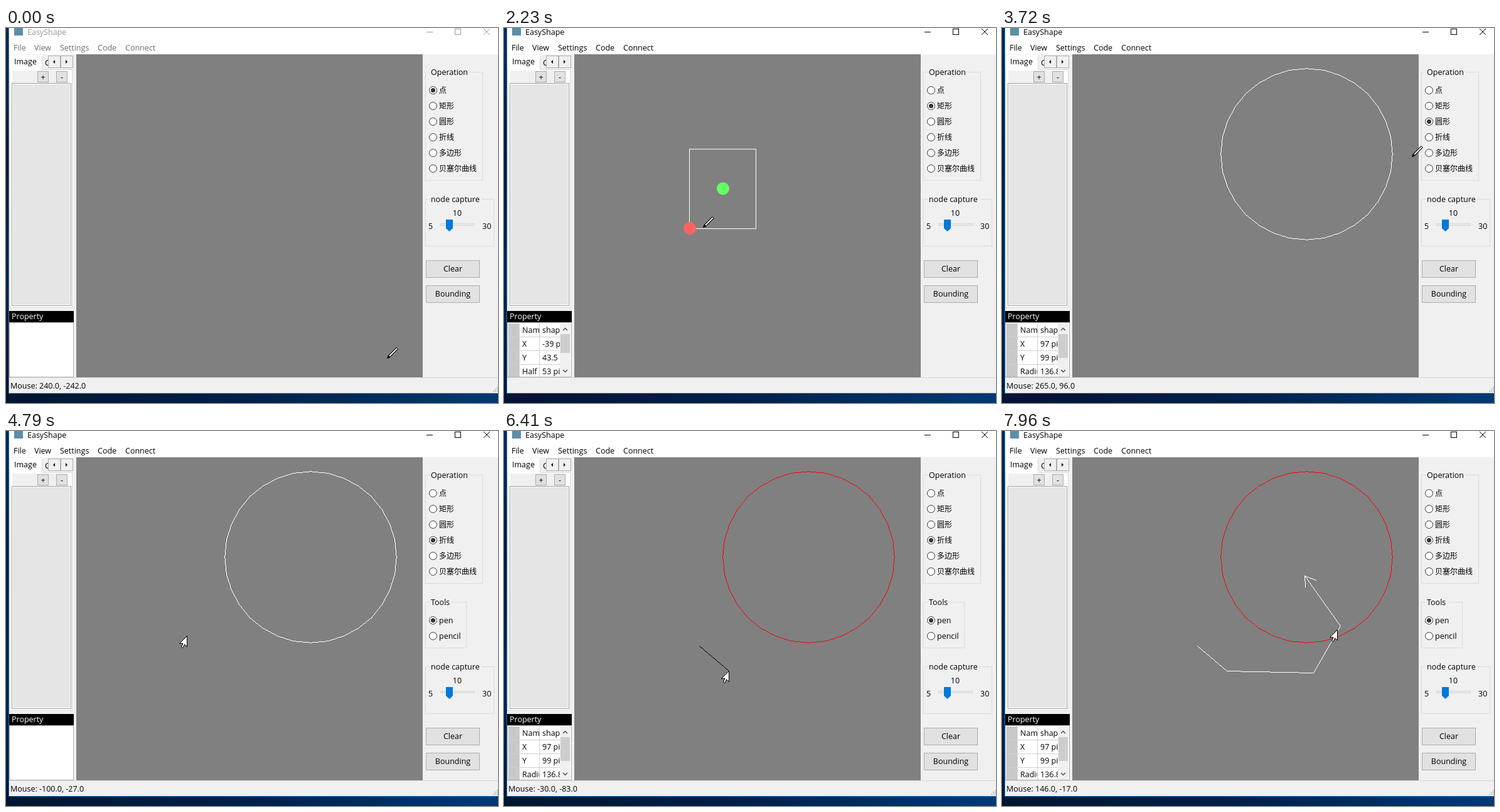
Write an HTML page with a canvas that moves like this. It is 784 px wide and 599 px high and loops after 8000 ms.

```html
<!DOCTYPE html>
<html lang="en">
<head>
<meta charset="utf-8">
<title>EasyShape</title>
<style>
html, body { margin: 0; width: 100%; height: 100%; overflow: hidden; background: #001a3c; }
canvas { display: block; }
</style>
</head>
<body>
<canvas id="stage" width="784" height="599"></canvas>
<script>
const g = document.getElementById('stage').getContext('2d');
const LOOP = 8000;
const SPEED = 1; // pointer speed in px per ms
const FONT = '12.5px "Open Sans", "Noto Sans", sans-serif';
const CJK = '12px "Noto Sans CJK SC", "Noto Sans CJK", sans-serif';
const operations = ['点', '矩形', '圆形', '折线', '多边形', '贝塞尔曲线'];
const opStart = [0, 1850, 3090, 4250];

const dot = { x: 392, y: 211, time: 690 };
const rect = { from: [402, 193], to: [296, 320], press: 2090, release: 2200 };
const ring = { from: [485, 201], to: [600, 275], press: 3290, release: 3450, picked: 5300 };
const line = [[311, 343], [358, 383], [496, 386], [539, 311], [482, 231]];
const lineTime = i => i ? 6410 + 285 * (i - 1) : 5950;
const lineDone = 7430;

const radioSpot = i => [678, 111 + 25 * i];

// Where the pointer goes: arrival time and place
const stops = [
  [0, [607, 526]], [620, [dot.x, dot.y]], [990, [659, 148]], [1300, radioSpot(1)],
  [rect.press, rect.from], [rect.release, rect.to], [2230, [317, 317]], [2700, radioSpot(2)],
  [ring.press, ring.from], [ring.release, ring.to], [3720, [653, 204]], [3950, radioSpot(3)],
  [4790, [288, 327]], [5480, [513, 262]],
  ...line.map((p, i) => [lineTime(i), p]),
  [7960, [534, 317]]
];

const distance = (a, b) => Math.hypot(a[0] - b[0], a[1] - b[1]);

function pointer(t) {
  const i = stops.findIndex(s => s[0] >= t);
  if (i < 0) return stops[stops.length - 1][1];
  if (!i) return stops[0][1];
  const [leave, a] = stops[i - 1], [arrive, b] = stops[i];
  const start = Math.max(leave, arrive - distance(a, b) / SPEED);
  const k = Math.max(0, (t - start) / (arrive - start));
  const ease = k * k * (3 - 2 * k);
  return a.map((v, j) => v + (b[j] - v) * ease);
}

function box(x, y, w, h, fill, stroke) {
  if (fill) { g.fillStyle = fill; g.fillRect(x, y, w, h); }
  if (stroke) { g.strokeStyle = stroke; g.strokeRect(x + .5, y + .5, w - 1, h - 1); }
}

function text(s, x, y, color = '#000', align = 'left', font = FONT) {
  g.font = font;
  g.fillStyle = color;
  g.textAlign = align;
  g.fillText(s, x, y);
}

function poly(points, stroke, fill, close) {
  g.beginPath();
  points.forEach(([x, y]) => g.lineTo(x, y));
  if (close) g.closePath();
  if (fill) { g.fillStyle = fill; g.fill(); }
  if (stroke) { g.strokeStyle = stroke; g.stroke(); }
}

// One pixel wide line without smoothing
function crisp(points, color) {
  g.fillStyle = color;
  for (let i = 1; i < points.length; i++) {
    const [x, y] = points[i - 1], dx = points[i][0] - x, dy = points[i][1] - y;
    const n = Math.ceil(Math.max(Math.abs(dx), Math.abs(dy), 1));
    for (let j = 0; j <= n; j++) g.fillRect(Math.round(x + dx * j / n), Math.round(y + dy * j / n), 1, 1);
  }
}

function disc(x, y, r, fill, stroke) {
  g.beginPath();
  g.arc(x, y, r, 0, 7);
  g.fillStyle = fill;
  g.fill();
  if (stroke) { g.strokeStyle = stroke; g.stroke(); }
}

function clipped(x, y, w, h, draw) {
  g.save();
  g.beginPath();
  g.rect(x, y, w, h);
  g.clip();
  draw();
  g.restore();
}

function gradient(w, y, h, x1, y1, ...colors) {
  const fill = g.createLinearGradient(0, y, x1, y1);
  colors.forEach((c, i) => fill.addColorStop(i / (colors.length - 1), c));
  box(0, y, w, h, fill);
}

function triangle(x, y, dx) {
  poly([[x, y], [x + dx, y - 3], [x + dx, y + 3]], null, '#000', true);
}

function chevron(y, dy) {
  poly([[94, y], [97.5, y + dy], [101, y]], '#505050');
}

function button(s, x, y, w, h, baseline) {
  box(x, y, w, h, '#e1e1e1', '#adadad');
  text(s, x + w / 2, y + baseline, '#000', 'center');
}

function drawWindow(active) {
  const edge = active ? '#1874bd' : '#6d7b8a';
  gradient(5, 0, 599, 0, 599, '#042a55', '#021a38', '#03244a', '#001530');
  gradient(784, 583, 16, 784, 583, '#001530', '#00204a', '#003a72');
  box(4, -1, 781, 585, '#f0f0f0', edge);
  box(5, 0, 779, 42, '#fff');
  box(13, 0, 14, 12, '#5b8fa8');
  text('EasyShape', 34, 11, active ? '#000' : '#999');
  let x = 12;
  for (const s of ['File', 'View', 'Settings', 'Code', 'Connect']) {
    text(s, Math.round(x), 36, active ? '#000' : '#6d6d6d');
    x += g.measureText(s).width + 13.6;
  }
  const ink = active ? '#000' : '#999';
  box(670, 6, 10, 1, ink);
  box(715, 1, 10, 10, null, ink);
  poly([[761, 1], [771, 11]], ink);
  poly([[761, 11], [771, 1]], ink);
  box(112, 42, 552, 516, '#808080');
  box(5, 558, 779, 1, '#d7d7d7');
}

function drawImagePanel() {
  box(5, 66, 101, 381, '#fff', '#dcdcdc');
  box(6, 43, 52, 25, '#fff');
  box(57, 45, 1, 21, '#d9d9d9');
  text('Image', 13, 58);
  clipped(58, 44, 9, 22, () => text('Code', 62, 60));
  [67, 87].forEach(x => box(x, 44, 20, 20, '#f0f0f0', '#adadad'));
  triangle(75, 54, 3);
  triangle(98, 54, -3);
  box(10, 68, 88, 20, '#f0f0f0');
  button('+', 50, 69, 18, 18, 14);
  button('-', 80, 69, 18, 18, 14);
  box(9, 88, 95, 356, '#fff', '#a0a0a0');
  box(11, 90, 91, 352, '#e5e5e5');
  box(5, 452, 103, 18, '#000');
  text('Property', 9, 465, '#fff');
}

function drawProperty(rows) {
  box(5, 470, 103, 88, '#fff', '#b0b0b0');
  if (!rows) return;
  clipped(6, 471, 101, 86, () => {
    box(7, 472, 17, 85, '#c8c8c8');
    rows.forEach(([name, value], i) => {
      const y = 472 + 22 * i;
      box(7, y + 21, 82, 1, '#d0d0d0');
      clipped(25, y, 31, 22, () => text(name, 29, y + 15));
      clipped(57, y, 32, 22, () => text(value, 61, y + 15));
    });
    box(24, 472, 1, 85, '#d0d0d0');
    box(56, 472, 1, 85, '#d0d0d0');
    box(89, 472, 17, 85, '#f0f0f0');
    box(90, 489, 15, rows.thumb, '#cdcdcd');
    g.lineWidth = 1.5;
    chevron(483, -3.5);
    chevron(546, 3.5);
  });
}

function group(title, y, w, h) {
  box(668, y, w, h, null, '#dcdcdc');
  g.font = FONT;
  box(675, y, g.measureText(title).width + 4, 1, '#f0f0f0');
  text(title, 677, y + 5);
}

function radio(label, cy, on, hover, font) {
  const ink = hover ? '#0078d7' : '#333';
  disc(680.5, cy, 6, '#fff', ink);
  if (on) disc(680.5, cy, 3.5, ink);
  text(label, 690, cy + 4.5, '#000', 'left', font);
}

function drawTools(op, [x, y]) {
  group('Operation', 70, 92, 174);
  operations.forEach((s, i) => {
    const cy = 99.5 + 25 * i;
    radio(s, cy, i === op, x > 672 && Math.abs(y - cy) < 12.5, CJK);
  });
  g.save();
  if (op === 3) {
    group('Tools', 273, 66, 74);
    radio('pen', 302.5, true);
    radio('pencil', 327.5, false);
    g.translate(0, 103);
  }
  group('node capture', 273, 110, 76);
  text('10', 719, 300, '#000', 'center');
  text('5', 673, 321);
  text('30', 759, 321);
  box(692, 312, 55, 4, '#e7eaea', '#d6d6d6');
  poly([[701, 306], [712, 306], [712, 320], [706.5, 325], [701, 320]], null, '#0078d7', true);
  button('Clear', 669, 371, 86, 28, 18);
  button('Bounding', 669, 411, 86, 28, 18);
  g.restore();
}

function nodes(center, corner) {
  disc(...center, 10, '#64ff64');
  disc(...corner, 10, '#ff6464');
}

const pixels = v => +v.toFixed(1) + ' pixel';

function details([x, y], name, size, thumb) {
  const rows = [['Name', 'shape'], ['X', pixels(x - 388)], ['Y', pixels(300 - y)], [name, pixels(size)]];
  return Object.assign(rows, { thumb });
}

const dragged = (shape, t) => t < shape.release ? pointer(t).map(Math.round) : shape.to;

function drawRect(t) {
  const [x0, y0] = rect.from, [x, y] = dragged(rect, t);
  const center = [(x0 + x) / 2, (y0 + y) / 2];
  box(x - 1, y0, x0 - x + 1, y - y0 + 1, null, '#fff');
  if (t < rect.release + 110) nodes(center, [x, y]);
  return t < opStart[2] && details(center, 'Half Width', (x0 - x) / 2, 30);
}

function drawRing(t, op) {
  const [cx, cy] = ring.from, edge = dragged(ring, t), r = distance(edge, ring.from);
  const points = Array.from({ length: 33 }, (_, i) => {
    const a = i * Math.PI / 16;
    return [cx + r * Math.cos(a), cy + r * Math.sin(a)];
  });
  const picked = t > ring.picked;
  const red = op === 3 && (picked || distance(pointer(t), ring.from) < r);
  crisp(points, red ? '#f00' : '#fff');
  if (t < ring.release + 110) nodes(ring.from, edge);
  return (op < 3 || picked) && details(ring.from, 'Radius', r, 38);
}

function drawLine(t) {
  const points = line.filter((_, i) => t >= lineTime(i));
  const done = t >= lineDone;
  if (points.length && points.length < line.length) points.push(pointer(t));
  crisp(points, done ? '#fff' : '#000');
  if (!done) return;
  const [x, y] = line[line.length - 1];
  crisp([[x + 18, y + 7], [x, y], [x + 1, y + 18]], '#fff');
}

function drawShapes(t, op) {
  let rows = null;
  if (t >= dot.time && t < rect.press) disc(dot.x, dot.y, 5, '#fff');
  if (t >= rect.press && t < ring.press) rows = drawRect(t);
  if (t >= ring.press) rows = drawRing(t, op);
  drawLine(t);
  drawProperty(rows);
}

function drawStatus(t) {
  const hidden = [[dot.time, 1080], [rect.press, 2310], [ring.press, 3600], [lineTime(4), 7650]];
  if (hidden.some(([a, b]) => t >= a && t < b)) return;
  let s = t;
  while (pointer(s)[0] > 664) s -= 5;
  const [x, y] = t < 70 ? [628, 542] : pointer(s).map(Math.round);
  text(`Mouse: ${(x - 388).toFixed(1)}, ${(300 - y).toFixed(1)}`, 7, 576);
  for (let i = 0; i < 3; i++)
    for (let j = 0; j <= i; j++) box(782 - 3 * j, 573 + 3 * i, 2, 2, '#bfbfbf');
}

function drawCursor(op, [x, y]) {
  g.save();
  if (op === 3) {
    g.translate(x + .5, y + .5);
    poly([[0, 0], [0, 17], [-4, 13.3], [-6.5, 19], [-9, 18], [-6.5, 12], [-12, 12]], '#000', '#fff', true);
  } else {
    g.translate(x, y + 2);
    g.lineWidth = 4;
    poly([[2.5, -2.5], [16.5, -16.5]], '#000');
    g.lineWidth = 1.8;
    poly([[4, -4], [16, -16]], '#fff');
    poly([[0, 0], [1, -4], [4, -1]], null, '#000', true);
  }
  g.restore();
}

function frame(clock) {
  const t = clock % LOOP, at = pointer(t);
  const op = opStart.filter(s => s <= t).length - 1;
  drawWindow(t >= dot.time);
  drawImagePanel();
  drawTools(op, at);
  drawShapes(t, op);
  drawStatus(t);
  drawCursor(op, at);
  requestAnimationFrame(frame);
}
requestAnimationFrame(frame);
</script>
</body>
</html>
```
